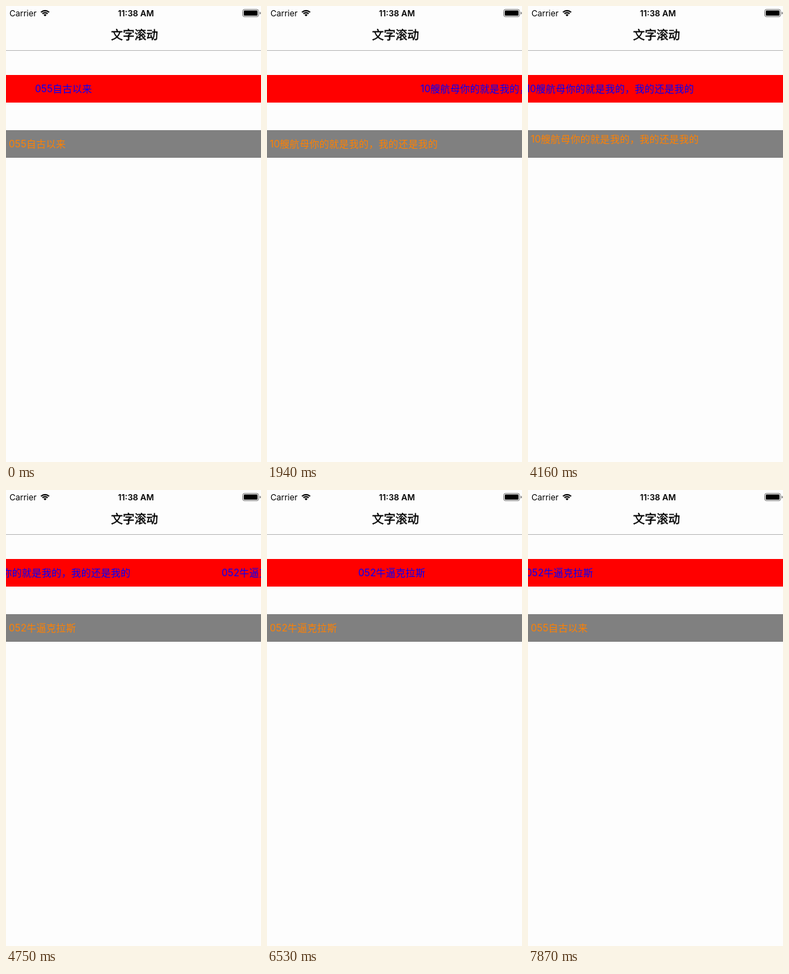
Write an HTML page that moves like this. It is 369 px wide and 661 px high and loops after 8000 ms.

```html
<!DOCTYPE html>
<html lang="zh-CN">
<head>
<meta charset="utf-8">
<title>文字滚动</title>
<style>
  html, body { margin: 0; width: 100%; height: 100%; overflow: hidden; background: #fdfdfd; }
  svg { display: block; width: 369px; height: 661px; }
  text { font-family: Inter, "Noto Sans CJK SC", "Noto Sans CJK", sans-serif; }
  .line { font-size: 14px; }
  .han { letter-spacing: .3px; }
  .status { font-size: 12px; }
  .title { font-size: 17px; stroke: #000; stroke-width: .45px; }
</style>
</head>
<body>
<svg viewBox="0 0 369 661">
  <defs>
    <clipPath id="pageClip"><rect y="180" width="369" height="40"/></clipPath>
  </defs>
  <rect width="369" height="661" fill="#fdfdfd"/>

  <text class="status" x="5" y="14.5">Carrier</text>
  <g fill="none" stroke="#000" stroke-width="2">
    <path d="M50.6 9.1A8.3 8.3 0 0 1 62.4 9.1"/>
    <path d="M52.8 11.3A5.2 5.2 0 0 1 60.2 11.3"/>
    <path d="M56.5 15L54.4 12.9A3 3 0 0 1 58.6 12.9Z" fill="#000" stroke="none"/>
  </g>
  <text class="status" x="188" y="14.5" text-anchor="middle" font-weight="600">11:38 AM</text>
  <rect x="342.5" y="5" width="23" height="10.5" rx="2.5" fill="none" stroke="#777" stroke-width="1"/>
  <rect x="344" y="6.5" width="20" height="7.5" rx="1.3"/>
  <path d="M367 8.3Q368.6 8.8 368.6 10.2T367 12.2Z" fill="#777"/>

  <text class="title" x="186" y="48.3" text-anchor="middle">文字滚动</text>
  <rect y="64" width="369" height="1" fill="#bababa"/>

  <rect y="100" width="369" height="40" fill="#f00"/>
  <g id="ticker" fill="#00f"></g>
  <rect y="180" width="369" height="40" fill="#808080"/>
  <g clip-path="url(#pageClip)"><g id="pager" fill="#ff8000"></g></g>
</svg>
<script>
  const LOOP = 8000;
  const TICK = 148.3;        // the picture advances in discrete ticks
  const SPEED = 15;          // ticker pixels per tick
  const GAP = 375;           // distance between ticker items
  const PAGE = 40;           // height of one pager row
  const FIRST_TURN = 10.8;   // in ticks
  const TURN_EVERY = 16.66;
  const TURN_TIME = 2;

  const items = [
    ['055', '自古以来'],
    ['10', '艘航母你的就是我的，我的还是我的'],
    ['052', '牛逼克拉斯'],
  ];

  const ticker = document.getElementById('ticker');
  const pager = document.getElementById('pager');

  function addLine(parent, [digits, han], x, y) {
    const el = document.createElementNS('http://www.w3.org/2000/svg', 'text');
    el.setAttribute('class', 'line');
    el.setAttribute('x', x);
    el.setAttribute('y', y);
    el.innerHTML = `${digits}<tspan class="han">${han}</tspan>`;
    parent.append(el);
  }

  items.forEach((item, i) => addLine(ticker, item, 42 + i * GAP, 125));
  [...items, items[0]].forEach((item, i) => addLine(pager, item, 4, 205 + i * PAGE));

  function smooth(p) {
    p = Math.min(1, Math.max(0, p));
    return p * p * (3 - 2 * p);
  }

  function draw(ms) {
    const tick = Math.floor((ms % LOOP) / TICK);
    let pages = 0;
    for (let i = 0; i < items.length; i++) {
      pages += smooth((tick - FIRST_TURN - i * TURN_EVERY) / TURN_TIME);
    }
    ticker.setAttribute('transform', `translate(${-tick * SPEED} 0)`);
    pager.setAttribute('transform', `translate(0 ${-pages * PAGE})`);
  }

  const start = performance.now();
  function frame() {
    draw(performance.now() - start);
    requestAnimationFrame(frame);
  }
  frame();
</script>
</body>
</html>
```
